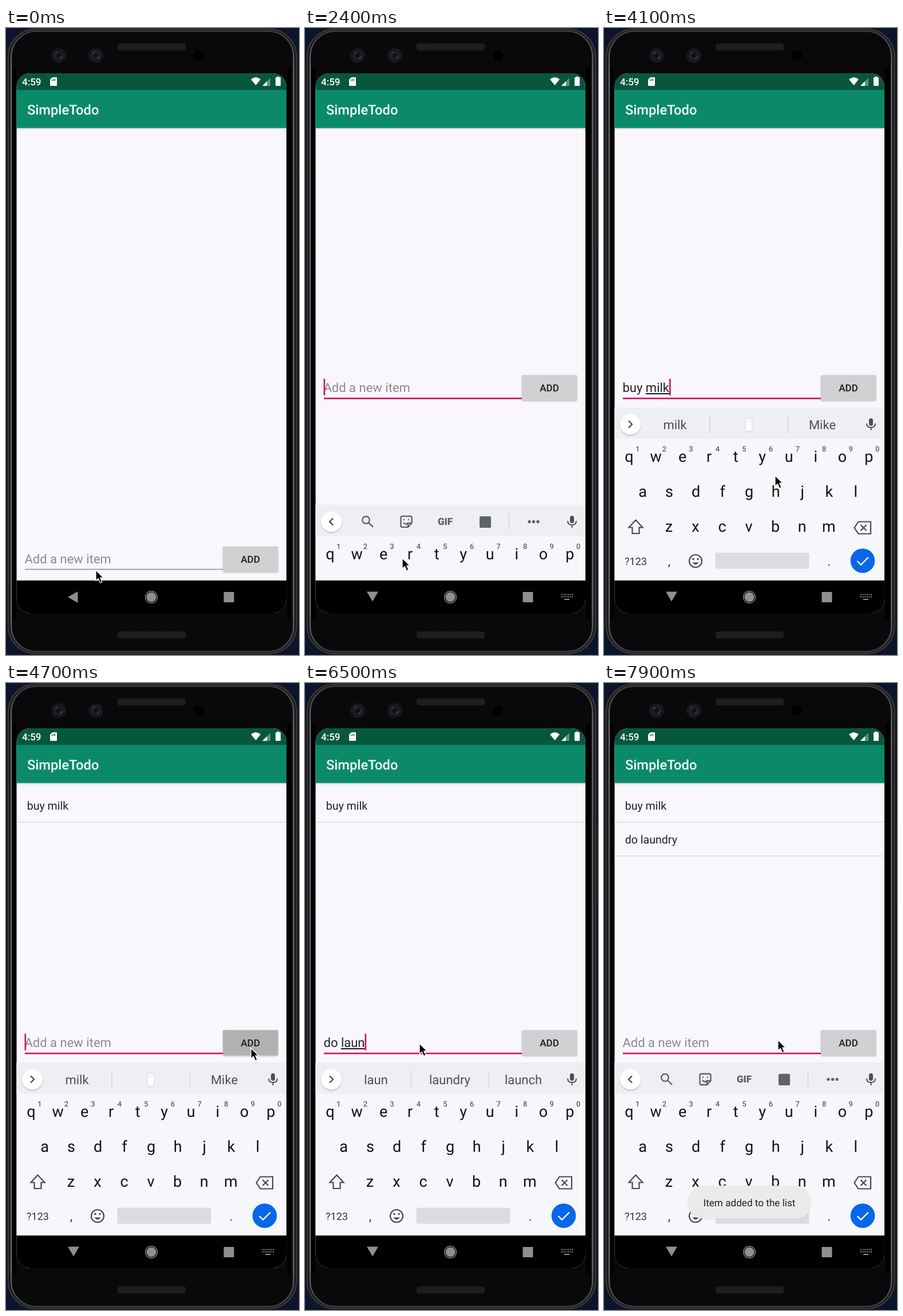
Write an HTML page that moves like this. It is 512 by 1094 pixels and loops after 8000 ms.

```html
<!DOCTYPE html>
<html lang="en">
<head>
<meta charset="utf-8">
<title>SimpleTodo</title>
<style>
html, body { margin: 0; width: 100%; height: 100%; overflow: hidden; background: #0b152d; }
svg { display: block; width: 100vw; height: 100vh; }
text { font-family: Roboto, "Noto Sans", sans-serif; white-space: pre; text-rendering: geometricPrecision; }
.medium { font-weight: 500; }
.mid { text-anchor: middle; }
.key { font-size: 27px; fill: #111214; }
.num { font-size: 13px; font-weight: 500; fill: #5b5e63; }
.field { font-size: 22px; fill: #232225; }
.item { font-size: 19.6px; fill: #212023; }
.sug { font-size: 22px; fill: #4c4f54; }
.line { fill: none; stroke: #46494d; stroke-width: 2.2; }
.icon { fill: none; stroke: #5b5e63; stroke-width: 2.3; }
.compose { text-decoration: underline; text-decoration-thickness: 1.3px; }
</style>
</head>
<body>
<svg viewBox="0 0 512 1094" preserveAspectRatio="none">
  <defs>
    <clipPath id="screen"><rect x="18.5" y="79" width="471.5" height="942" rx="24"/></clipPath>
    <clipPath id="content"><rect x="18" y="175" width="473" height="789"/></clipPath>
    <linearGradient id="drop" x2="0" y2="1">
      <stop stop-color="#000" stop-opacity=".13"/><stop offset="1" stop-color="#000" stop-opacity="0"/>
    </linearGradient>
    <linearGradient id="rim" x2="0" y2="1">
      <stop stop-color="#3c3b3e"/><stop offset=".06" stop-color="#6b6a6d"/>
      <stop offset=".94" stop-color="#6b6a6d"/><stop offset="1" stop-color="#3c3b3e"/>
    </linearGradient>
    <pattern id="mesh" width="4" height="4" patternUnits="userSpaceOnUse">
      <rect width="4" height="4" fill="#232225"/><path d="M0 4L4 0" stroke="#111013"/>
    </pattern>
    <filter id="soft" x="-20%" y="-30%" width="140%" height="170%">
      <feDropShadow dx="0" dy="1.5" stdDeviation="1.3" flood-opacity=".27"/>
    </filter>
    <g id="camera">
      <circle r="13" fill="#17181c"/><circle r="8" fill="#202228"/><circle r="5" fill="#121317"/>
      <path d="M-5-3A6 6 0 0 1-2-6M2 5A6 6 0 0 0 6 1" stroke="#4b4e56" stroke-width="1.5" fill="none"/>
    </g>
    <g id="speaker"><rect width="119" height="12" rx="4" fill="url(#mesh)" stroke="#171619"/></g>
  </defs>

  <!-- phone body -->
  <rect x="1" y="0" width="509.500" height="1093.500" rx="50" fill="#151417"/>
  <rect x="4" y="2" width="503.500" height="1089.500" rx="48" fill="none" stroke="#39383b" stroke-width="2.500"/>
  <rect x="9" y="5.500" width="493.500" height="1082.500" rx="44" fill="#09080a" stroke="url(#rim)" stroke-width="2.300"/>
  <path d="M14.500 70V1030M495 70V1030" stroke="#000" stroke-width="7"/>
  <path d="M511 240V386" stroke="#171a23" stroke-width="2"/>
  <use href="#camera" x="92" y="48"/><use href="#camera" x="157" y="48"/>
  <circle cx="337" cy="48" r="9" fill="#000"/>
  <use href="#speaker" x="195" y="27"/><use href="#speaker" x="195" y="1053"/>

  <g clip-path="url(#screen)">
    <rect x="18" y="79" width="473" height="943" fill="#f9f7fb"/>
    <rect x="18" y="174.500" width="473" height="4" fill="url(#drop)"/>
    <rect x="18" y="79" width="473" height="29" fill="#07573f"/>
    <rect x="18" y="108" width="473" height="66.600" fill="#0b8a69"/>
    <text x="28" y="99.500" font-size="17" class="medium" fill="#fff">4:59</text>
    <g fill="#fff">
      <path d="M81 86H88Q89 86 89 87V100Q89 101 88 101H78Q77 101 77 100V90Z"/>
      <path d="M428 89.500Q436.500 82.500 445 89.500L436.500 100Z"/>
      <path d="M448 101L462 87V101Z" opacity=".35"/><path d="M448 101L456 93V101Z"/>
      <path d="M473.500 86V84.800H477.500V86H479Q480 86 480 87V100Q480 101 479 101H472Q471 101 471 100V87Q471 86 472 86Z"/>
    </g>
    <path d="M80.500 90V92.500M83 88.500V92.500M85.500 88.500V92.500" stroke="#07573f" stroke-width="1.2"/>
    <text x="37" y="150.500" font-size="23.700" class="medium" fill="#f3fbf8">SimpleTodo</text>

    <g id="items"></g>

    <g clip-path="url(#content)">
      <g id="bar">
        <text id="hint" class="field" x="32.500" y="934">Add a new item</text>
        <text id="typed" class="field" x="32.500" y="934"><tspan id="done"></tspan><tspan id="word" class="compose"></tspan></text>
        <rect id="rule" x="33" width="347"/>
        <rect id="caret" y="911" width="2.600" height="29" fill="#d8086a"/>
        <rect id="button" x="379" y="904.500" width="96.500" height="44" rx="2" filter="url(#soft)"/>
        <text x="427" y="932.500" font-size="17" class="medium mid" fill="#1c1c1e">ADD</text>
      </g>
      <g id="board">
        <rect x="18" y="662" width="473" height="302" fill="#f6f7fb"/>
        <rect x="18" y="662" width="473" height="55" fill="#edeff3"/>
        <circle cx="46" cy="691.500" r="18" fill="#fff" filter="url(#soft)"/>
        <path id="chevron" class="line"/>
        <g fill="#4c4f54">
          <rect x="463" y="681" width="7" height="13" rx="3.500"/>
          <path d="M459 690Q459 697 466.500 697T474 690M466.500 697V702" fill="none" stroke="#4c4f54" stroke-width="2"/>
        </g>
        <g id="sugs">
          <path d="M185 677V706M321.500 677V706" stroke="#cfd1d5" stroke-width="1.3"/>
          <text class="sug mid" x="124" y="700"></text>
          <text class="sug mid" x="253" y="700"></text>
          <text class="sug mid" x="381.500" y="700"></text>
          <g id="glass">
            <path d="M246 680.500H260L258.500 704.500H247.500Z" fill="#f6f7f8" stroke="#d9dbde"/>
            <path d="M246.800 687H259.200L258 703H248Z" fill="#fff" stroke="#e2e4e6"/>
          </g>
        </g>
        <g id="tools">
          <circle cx="106.500" cy="688.500" r="6.300" class="icon"/><path d="M111 693L119 701" class="icon" stroke-width="3"/>
          <path d="M170 682H184Q186.500 682 186.500 684.500V694L180 701H170Q167.500 701 167.500 698.500V684.500Q167.500 682 170 682ZM186 694H180V700M172 693Q176 698 179 694M172 688H174M180 688H182" class="icon" stroke-width="2"/>
          <text x="245" y="697" font-size="17" font-weight="800" class="mid" fill="#5b5e63">GIF</text>
          <rect x="305" y="682" width="20" height="20" rx="2" fill="#5f6368"/>
          <path d="M356.500 677V706" stroke="#cfd1d5" stroke-width="1.3"/>
          <g fill="#5b5e63"><circle cx="392" cy="691.500" r="2.600"/><circle cx="399.500" cy="691.500" r="2.600"/><circle cx="407" cy="691.500" r="2.600"/></g>
        </g>
        <g id="keys"></g>
        <path d="M55.500 858.500L43.500 871.500H49.500V882H61.500V871.500H67.500Z" class="line"/>
        <path d="M444.500 861.500H466V882.500H444.500L437.500 872ZM448.500 867L458.500 877M458.500 867L448.500 877" class="line"/>
        <text x="55.500" y="936.500" font-size="18" class="mid" fill="#303236">?123</text>
        <text x="114" y="938" font-size="22" class="mid" fill="#303236">,</text>
        <text x="393.500" y="938" font-size="22" class="mid" fill="#303236">.</text>
        <circle cx="160" cy="930" r="11" class="line"/>
        <path d="M154.500 932.500Q160 940 165.500 932.500Z" fill="#46494d"/>
        <circle cx="156" cy="926.500" r="1.700" fill="#46494d"/><circle cx="164" cy="926.500" r="1.700" fill="#46494d"/>
        <rect x="194.500" y="915.500" width="164" height="28" rx="4" fill="#dcdbdf"/>
        <circle cx="452" cy="929.500" r="21.300" fill="#0866e8"/>
        <path d="M442.500 930L449 936.500L462 923.500" fill="none" stroke="#fff" stroke-width="2.300"/>
      </g>
      <g id="toast">
        <rect x="145.500" y="877.500" width="217" height="59" rx="28" fill="#000" fill-opacity=".04"/>
        <rect x="146" y="877" width="216" height="58" rx="28" fill="#ebebed" fill-opacity=".95"/>
        <text x="254" y="912.500" font-size="17.150" class="mid" fill="#202022">Item added to the list</text>
      </g>
    </g>

    <rect x="18" y="964" width="473" height="58" fill="#000"/>
    <g fill="#908e90">
      <path id="back"/>
      <circle cx="254" cy="993" r="8.500"/><circle cx="254" cy="993" r="10.400" fill="none" stroke="#908e90" stroke-width="1.300"/>
      <rect x="380.500" y="984" width="18" height="18" rx="1"/>
      <path id="switcher" d="M448 988.500H468M448 992.500H468" fill="none" stroke="#908e90" stroke-width="2" stroke-dasharray="2 1.600"/>
      <rect id="space" x="453" y="996" width="9" height="2"/>
    </g>
  </g>
  <path id="pointer" d="M0 0V18.500L4.300 14.500L7.500 22L11 20.500L7.800 13.200H13.300Z" fill="#000" stroke="#fff" stroke-width="1.300" stroke-linejoin="round"/>
</svg>
<script>
const LOOP = 8000, STEP = 100;
const $ = id => document.getElementById(id);
const set = (el, attrs) => { for (const k in attrs) el.setAttribute(k, attrs[k]); };
const show = (el, on) => el.style.display = on ? '' : 'none';
const clamp = v => Math.max(0, Math.min(1, v));
const ramp = (t, a, b) => clamp((t - a) / (b - a));
const within = (t, a, b) => t >= a && t < b;

function add(parent, tag, attrs, text = '') {
  const el = document.createElementNS('http://www.w3.org/2000/svg', tag);
  set(el, attrs);
  el.textContent = text;
  return parent.appendChild(el);
}

// rows: letters, first key centre, baseline
[['qwertyuiop', 44, 757], ['asdfghjkl', 67.5, 818], ['zxcvbnm', 113.5, 879]].forEach(([row, x, y], r) => {
  [...row].forEach((ch, i) => {
    const cx = x + i * 46.55;
    add($('keys'), 'text', { class: 'key mid', x: cx, y }, ch);
    if (!r) add($('keys'), 'text', { class: 'num mid', x: cx + 14.8, y: 739 }, (i + 1) % 10);
  });
});

const items = [['buy milk', 4700], ['do laundry', 7600]].map(([name, at], i) => {
  const el = add($('items'), 'g', { transform: `translate(0 ${i * 59})` });
  add(el, 'text', { class: 'item', x: 36.7, y: 220.5 }, name);
  add(el, 'rect', { x: 18, y: 242, width: 473, height: 1.5, fill: '#dcdade' });
  return { el, at };
});

// time, field text, suggestions (none means the toolbar)
const typing = [
  [0, '', ''],
  [2900, 'b', 'be but by'], [3000, 'bu', 'but bu buy'], [3100, 'buy', 'buy but buying'],
  [3300, 'buy ', 'the it some'], [3400, 'buy m', 'my me more'], [3500, 'buy mi', 'mi mine milk'],
  [3600, 'buy mil', 'mil milk mile'], [3700, 'buy milk', 'milk * Mike'],
  [4700, '', 'milk * Mike'], [4800, '', ''],
  [6000, 'd', "do don't does"], [6100, 'do', "do don't does"], [6200, 'do ', 'you it not'],
  [6300, 'do l', 'like love let'], [6400, 'do la', 'la last late'], [6500, 'do laun', 'laun laundry launch'],
  [6700, 'do laund', 'laund laundry launder'], [6800, 'do laundr', 'laundr laundry laundry'],
  [7000, 'do laundry', 'laundry laundries laundry'],
  [7600, '', 'laundry laundries laundry'], [7700, '', '']
];

const path = [
  [0, 157, 946], [100, 181, 921], [1300, 181, 921], [1400, 175, 920], [1900, 175, 920],
  [2000, 170, 925], [3700, 170, 925], [4500, 428, 637], [4800, 428, 637], [4900, 370, 640],
  [5000, 289, 636], [5100, 289, 636], [5400, 200, 629], [6900, 200, 629], [7400, 430, 630],
  [7700, 430, 630], [7900, 304, 623], [LOOP, 304, 623]
];

function pointerAt(t) {
  const i = path.findIndex(p => p[0] > t);
  const [a, x, y] = path[i - 1], [b, u, v] = path[i];
  const k = ramp(t, a, b), e = k * k * (3 - 2 * k);
  return [x + (u - x) * e, y + (v - y) * e];
}

const toastAt = t => Math.max(
  Math.min(ramp(t, 4700, 5000), 1 - ramp(t, 6200, 6500)),
  ramp(t, 7600, 7900));

function drawField(t, text) {
  const focused = t >= 2100;
  const cut = text.lastIndexOf(' ') + 1;
  $('done').textContent = text.slice(0, cut);
  $('word').textContent = text.slice(cut);
  show($('hint'), !text);
  $('hint').style.fill = within(t, 2000, 2300) ? '#6b696d' : '#8d8b8f';
  set($('rule'), focused ? { y: 944, height: 2.6, fill: '#d8086a' } : { y: 943.8, height: 1.4, fill: '#858387' });

  const keys = typing.filter(s => s[0] <= t && s[1]);
  const since = keys.length ? keys[keys.length - 1][0] : 2100;
  show($('caret'), focused && (t - since) % 1000 < 500);
  set($('caret'), { x: 32.5 + (text ? $('typed').getComputedTextLength() : 0) });
}

function drawStrip(list) {
  const words = list ? list.split(' ') : [];
  show($('sugs'), list);
  show($('tools'), !list);
  set($('chevron'), { d: list ? 'M43 685.5L49 691.5L43 697.5' : 'M49 685.5L43 691.5L49 697.5' });
  $('sugs').querySelectorAll('text').forEach((el, i) => el.textContent = words[i] === '*' ? '' : words[i] || '');
  show($('glass'), words.includes('*'));
}

function draw(t) {
  const [, text, list] = typing.filter(s => s[0] <= t).pop();
  const open = t >= 2400, rise = ramp(t, 2300, 2700);
  drawField(t, text);
  drawStrip(list);
  items.forEach(i => show(i.el, t >= i.at));

  set($('bar'), { transform: `translate(0 ${open ? -299 : 0})` });
  const pressed = within(t, 4600, 4900) || within(t, 7500, 7800);
  set($('button'), { fill: pressed ? '#b0b1b2' : '#ced0d1' });

  show($('board'), open);
  set($('board'), { transform: `translate(0 ${302 * (1 - rise) ** 2})` });
  set($('back'), { d: open ? 'M108 983.5H128L118 1000.5Z' : 'M108 993L125.5 983V1003Z' });
  show($('switcher'), open);
  show($('space'), open);

  set($('toast'), { opacity: toastAt(t) });
  const [x, y] = pointerAt(t);
  set($('pointer'), { transform: `translate(${x} ${y})` });
}

const start = performance.now();
function tick() {
  const t = (performance.now() - start) % LOOP;
  draw(Math.floor(t / STEP) * STEP);
  requestAnimationFrame(tick);
}
tick();
</script>
</body>
</html>
```
